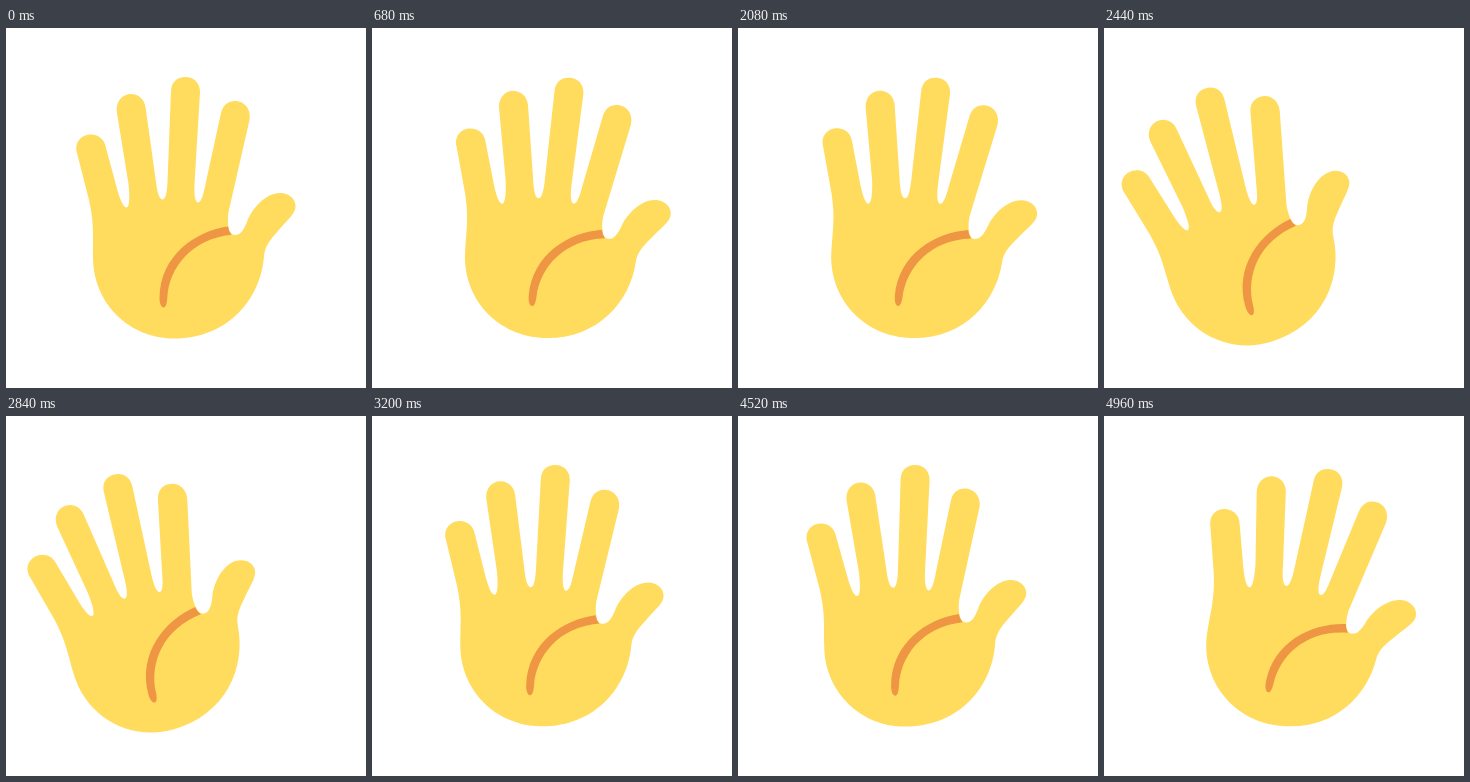
An HTML page for the animation above (5000 ms loop, 360x360 px).

```html
<!DOCTYPE html>
<html lang="en">
<head>
<meta charset="utf-8">
<title>Waving hand</title>
<style>
  html, body { margin: 0; height: 100%; overflow: hidden; background: #fff; }
  svg { display: block; width: 100%; height: 100%; }
</style>
</head>
<body>
<svg viewBox="0 0 360 360">
  <g id="hand">
    <path fill="#ffdc5d" d="M71 125
      C68 115 75 106.500 85 106.500 C92 106.500 98 111 99.500 118
      L110 157 C113 169 117 179.500 120.500 179.500 C123.500 179.500 124 170 122.500 156
      L110.800 84 C109.500 74 116 66 125 66 C133 66 138.500 72 139.500 79
      L150 154 C151 163 153 171.500 156.500 171.500 C160 171.500 161 163 161.500 154
      L165 63 C165.500 54 171 49 179.500 49 C188 49 194 55 194 64
      L188.500 156 C188 166 189 174.500 192 174.500 C195.500 174.500 197.500 166 199.500 156
      L215 85 C217 77 222 73 229 73 C239 73 245.500 82 243.500 92
      L222.500 184 C221 194 222 207 229 207 C235 207 238 201 241 194
      C246 180 260 165 274 165 C283 165 290 171 289.500 179
      C289 186 282 191 272 203 C264 212 259 218 258 228
      C255 270 223 310.500 168 310.500 C124 310.500 87 276 87 229
      C87 205 88 195 83 172 Z"/>
    <path fill="#ef9645" d="M222 198.500 C190 203 154 227 153.500 270
      C153.500 276 155.500 279.500 157.500 279.500 C160 279.500 161 275 161.300 270
      C163 240 185 211 225.500 206.800 Q222.500 203 222 198.500 Z"/>
  </g>
</svg>
<script>
const hand = document.getElementById("hand");
const LOOP = 5000, WAVE = 2000, STEP = 40;
const HIGH = 15.6, LOW = -21;
// [ms, degrees]
const keys = [[20, 0], [213, HIGH], [407, LOW], [614, HIGH], [800, LOW], [1000, HIGH], [1220, 0]];

// Halfway between linear and sine easing
const ease = u => (u + (1 - Math.cos(Math.PI * u)) / 2) / 2;

function angleAt(t) {
  const i = keys.findIndex(([time]) => time > t);
  if (i < 1) return 0;
  const [t0, a0] = keys[i - 1], [t1, a1] = keys[i];
  return a0 + (a1 - a0) * ease((t - t0) / (t1 - t0));
}

function draw() {
  const t = Math.floor(performance.now() % LOOP / STEP) * STEP;
  hand.setAttribute("transform", `rotate(${angleAt(t % WAVE)} 178.6 314.7)`);
  requestAnimationFrame(draw);
}
draw();
</script>
</body>
</html>
```
